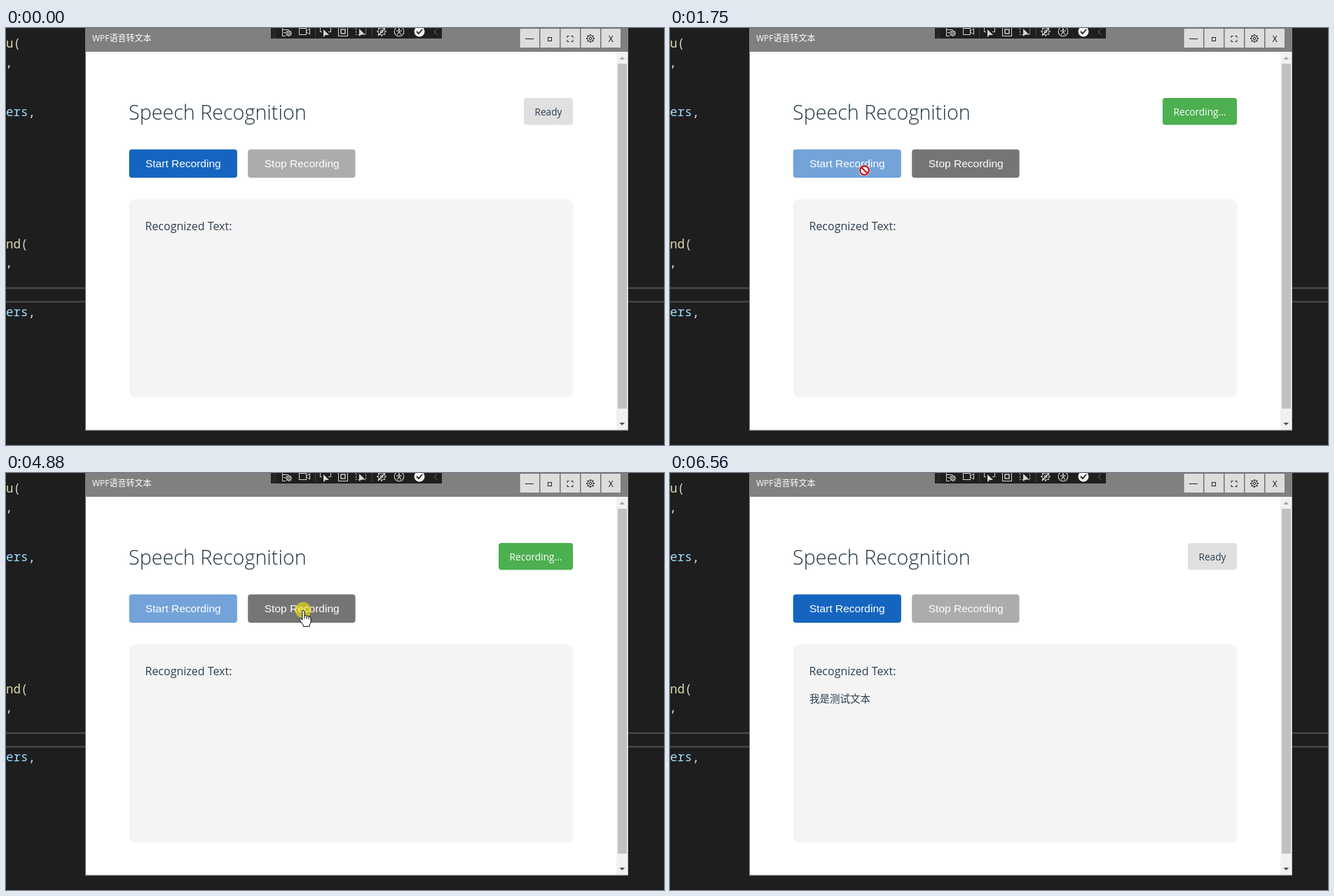
These frames come from a looping animation (939 px wide and 596 px high, 7.44 s). An HTML page with a canvas:

```html
<!DOCTYPE html>
<html lang="en">
<head>
<meta charset="utf-8">
<title>Speech Recognition</title>
<style>
html, body { margin: 0; width: 100%; height: 100%; overflow: hidden; background: #1e1e1e; }
canvas { display: block; }
</style>
</head>
<body>
<canvas id="stage" width="939" height="596"></canvas>
<script>
const ctx = document.getElementById('stage').getContext('2d');
const LOOP = 7440;
const UI = '"Open Sans", "Noto Sans CJK SC", "Noto Sans CJK", sans-serif';
const CJK = '"Noto Sans CJK SC", "Noto Sans CJK", sans-serif';
const ARIAL = '"Liberation Sans", Arial, sans-serif';
const MONO = '"Noto Sans Mono", "DejaVu Sans Mono", monospace';
const INK = '#2c3e50';

function box(x, y, w, h, fill, r = 0) {
  ctx.fillStyle = fill;
  ctx.beginPath();
  ctx.roundRect(x, y, w, h, r);
  ctx.fill();
}

function frame(x, y, w, h, color, width = 1) {
  ctx.strokeStyle = color;
  ctx.lineWidth = width;
  ctx.strokeRect(x, y, w, h);
}

function text(str, x, y, font, color, align = 'left') {
  ctx.font = font;
  ctx.fillStyle = color;
  ctx.textAlign = align;
  ctx.fillText(str, x, y);
}

function line(color, width, ...pts) {
  ctx.strokeStyle = color;
  ctx.lineWidth = width;
  ctx.beginPath();
  for (let i = 0; i < pts.length; i += 2) ctx.lineTo(pts[i], pts[i + 1]);
  ctx.stroke();
}

function poly(fill, ...pts) {
  ctx.fillStyle = fill;
  ctx.beginPath();
  for (let i = 0; i < pts.length; i += 2) ctx.lineTo(pts[i], pts[i + 1]);
  ctx.closePath();
  ctx.fill();
}

function ring(x, y, r, color, width) {
  ctx.strokeStyle = color;
  ctx.lineWidth = width;
  ctx.beginPath();
  ctx.arc(x, y, r, 0, Math.PI * 2);
  ctx.stroke();
}

function disc(x, y, r, color) {
  ctx.fillStyle = color;
  ctx.beginPath();
  ctx.arc(x, y, r, 0, Math.PI * 2);
  ctx.fill();
}

function gear(x, y, r, color) {
  ring(x, y, r, color, 1);
  ring(x, y, r * 0.4, color, 1);
  for (let i = 0; i < 8; i++) {
    const a = i * Math.PI / 4, c = Math.cos(a), s = Math.sin(a);
    line(color, 1.6, x + c * r, y + s * r, x + c * (r + 1.8), y + s * (r + 1.8));
  }
}

function corners(x, y, s, leg, color) {
  for (const dx of [-1, 1]) for (const dy of [-1, 1]) {
    const cx = x + dx * s, cy = y + dy * s;
    line(color, 1, cx - dx * leg, cy, cx, cy, cx, cy - dy * leg);
  }
}

function drawEditor() {
  box(0, 0, 939, 596, '#1e1e1e');
  const font = '17.5px ' + MONO;
  const code = (str, x, y, color) => text(str, x, y, font, color);
  code('u', 0, 28, '#dcdcaa');
  code('(', 10.5, 28, '#d4d4d4');
  code(',', -1, 55, '#d4d4d4');
  code('nd', 0, 315, '#dcdcaa');
  code('(', 21, 315, '#d4d4d4');
  code(',', -1, 341, '#d4d4d4');
  for (const y of [126, 412]) {
    code('ers', 0, y, '#9cdcfe');
    code(',', 31.5, y, '#d4d4d4');
  }
  for (const y of [370.5, 390]) box(0, y, 939, 2.5, '#464646');
}

function drawToolbar() {
  const c = '#d6d6d6';
  box(378, 0, 244, 15, '#1f1f1f');
  for (let y = 1; y < 14; y += 3) for (const x of [381, 384]) box(x, y, 1, 1, '#5a5a5a');
  for (const x of [441, 522]) box(x, 0, 1, 13, '#444');

  line(c, 1, 394.5, 0, 394.5, 11.5, 399, 11.5);
  line(c, 1, 394, 2.5, 403, 2.5);
  line(c, 1, 396, 6.5, 399, 6.5);
  gear(403.5, 7.5, 2.8, c);

  frame(418.5, 0.5, 10, 9, c);
  line(c, 1, 429, 4, 433.5, 1, 433.5, 9, 429, 6);

  line(c, 1, 448.5, 0, 448.5, 5.5, 451, 5.5);
  line(c, 1, 463.5, 0, 463.5, 5.5, 460, 5.5);
  poly(c, 453, 2, 453, 13, 456, 10, 461, 10);

  frame(474.5, -1.5, 13, 13, c);
  frame(478, 2, 6, 6, c, 1.4);

  ctx.setLineDash([2, 2]);
  frame(499.5, -3.5, 14, 13, c);
  ctx.setLineDash([]);
  poly(c, 504, 1, 504, 12, 507, 9, 512, 9);

  gear(536, 5, 5, c);
  line(c, 1.5, 531, 11, 541, 0);

  ring(561, 5, 6.8, c, 1.1);
  disc(561, 1.8, 1.2, c);
  line(c, 1.2, 557, 4, 565, 4);
  line(c, 1.2, 558.5, 9.5, 561, 5, 563.5, 9.5);

  disc(590, 5, 7.5, '#f2f2f2');
  line('#1f1f1f', 1.8, 586, 5, 589, 8, 594, 2);
  line('#777', 1, 615, 1.5, 611, 5.5, 615, 9.5);
}

function drawWindow() {
  box(113, 0, 775, 575.5, '#808080');
  box(114, 34, 757, 540.5, '#fff');
  text('WPF语音转文本', 123, 19, '12px ' + UI, '#fff');

  for (let i = 0; i < 5; i++) {
    box(732.5 + i * 29, 0, 29, 28.5, '#707070');
    box(733.5 + i * 29, 1, 27.5, 27, '#dddddd');
  }
  line('#222', 1, 741, 15.5, 753, 15.5);
  frame(773.5, 13.5, 5, 5, '#222');
  corners(805, 15.5, 4, 2.5, '#222');
  gear(834, 15, 4.2, '#222');
  text('X', 863.2, 19.5, '12px ' + UI, '#111', 'center');

  box(871, 34, 16.5, 540.5, '#f1f1f1');
  box(873, 51, 13, 493, '#c1c1c1');
  poly('#a3a3a3', 875.5, 45, 883, 45, 879.2, 41);
  poly('#505050', 875.5, 564, 883, 564, 879.2, 568);
}

function drawPage(recording, done) {
  text('Speech Recognition', 175, 131, '300 28.7px ' + UI, '#22343f');
  const badge = '13.7px ' + UI;
  if (recording) {
    box(703, 100, 106, 38.5, '#4caf50', 4);
    text('Recording...', 756, 124.7, badge, '#fff', 'center');
  } else {
    box(739, 100, 70, 38.5, '#e0e0e0', 4);
    text('Ready', 774, 124.7, badge, INK, 'center');
  }
  box(175.7, 173.5, 154.2, 40.5, recording ? '#73a3d9' : '#1565c0', 4);
  box(345.2, 173.5, 153.4, 40.5, recording ? '#757575' : '#acacac', 4);
  const label = '15.5px ' + ARIAL;
  text('Start Recording', 252.8, 199, label, '#fff', 'center');
  text('Stop Recording', 422.2, 199, label, '#fff', 'center');

  box(175.7, 245, 633.3, 283, '#f4f4f4', 8);
  text('Recognized Text:', 198.5, 289, '16px ' + UI, INK);
  if (done) text('我是测试文本', 199, 327.5, '14.5px ' + CJK, INK);
}

const shapes = {
  arrow: new Path2D('M.5 .8V16.2L4.1 12.8L6.6 18.5L9 17.4L6.5 11.9H11.4Z'),
  hand: new Path2D('M-1.2 14V2.2Q-1.2 .6 .4 .6Q2 .6 2 2.2V8Q4.5 6.6 5 8.6Q7.4 7.4 8 9.4' +
    'Q11 8.6 11 11.4V16.5Q11 19 9.2 20.8V23.3H.3V21.2Q-2.2 18.6-5 14Q-5.8 12.2-4.2 11.8Q-2.8 11.4-1.2 14Z')
};

const cursors = {
  arrow: () => outline(shapes.arrow),
  hand() {
    outline(shapes.hand);
    line('#000', 1, 2, 8, 2, 12);
    line('#000', 1, 5, 8.6, 5, 12.5);
    line('#000', 1, 8, 9.4, 8, 13);
  },
  block() {
    disc(0.5, 0.5, 8, '#fff');
    ring(0.5, 0.5, 6.3, '#c00d16', 2.2);
    line('#c00d16', 2.2, -3.8, -3.8, 4.8, 4.8);
  }
};

function outline(path) {
  ctx.fillStyle = '#fff';
  ctx.fill(path);
  ctx.strokeStyle = '#000';
  ctx.lineWidth = 1;
  ctx.stroke(path);
}

const moves = [
  { t: 250, dt: 68, n: 6, from: 0, pts: [[791, 535], [715, 490], [610, 418], [495, 348], [419, 312], [438, 297]] },
  { t: 860, dt: 70, n: 8, from: 1, pts: [[438, 297], [277, 203]] },
  { t: 2880, dt: 65, n: 7, from: 1, pts: [[277, 203], [310, 212], [350, 214], [390, 206], [424, 196]] },
  { t: 5880, dt: 68, n: 10, from: 1, pts: [[424, 196], [426, 187], [442, 171], [482, 170], [540, 192],
    [610, 246], [685, 325], [755, 412], [815, 485], [862, 543], [892, 586]] }
];

function pointer(t) {
  if (t < 250 || t >= 6560) return null;
  const m = moves.filter(v => t >= v.t).pop();
  const k = Math.min(m.n - 1, Math.floor((t - m.t) / m.dt));
  const f = (k + m.from) / (m.n - 1 + m.from) * (m.pts.length - 1);
  const i = Math.min(m.pts.length - 2, Math.floor(f));
  const [a, b] = [m.pts[i], m.pts[i + 1]];
  const at = j => Math.round(a[j] + (b[j] - a[j]) * (f - i));
  return { x: at(0), y: at(1) };
}

function cursorKind(t, p) {
  if (t < 1420) return 'arrow';
  if (t < 1750) return 'hand';
  if (t < 3470) return p.x < 330 ? 'block' : 'arrow';
  if (t < 5160) return 'hand';
  return p.x < 498 && p.y >= 174 ? 'block' : 'arrow';
}

function draw(t) {
  drawEditor();
  drawWindow();
  drawToolbar();
  drawPage(t >= 1680 && t < 5080, t >= 5080);
  const p = pointer(t);
  if (!p) return;
  const pressed = (t >= 1550 && t < 1680) || (t >= 4880 && t < 5080);
  if (pressed) disc(p.x, p.y, 11.5, 'rgba(255, 240, 0, 0.57)');
  ctx.save();
  ctx.translate(p.x, p.y);
  cursors[cursorKind(t, p)]();
  ctx.restore();
}

const start = performance.now();
function tick() {
  draw((performance.now() - start) % LOOP);
  requestAnimationFrame(tick);
}
tick();
</script>
</body>
</html>
```
